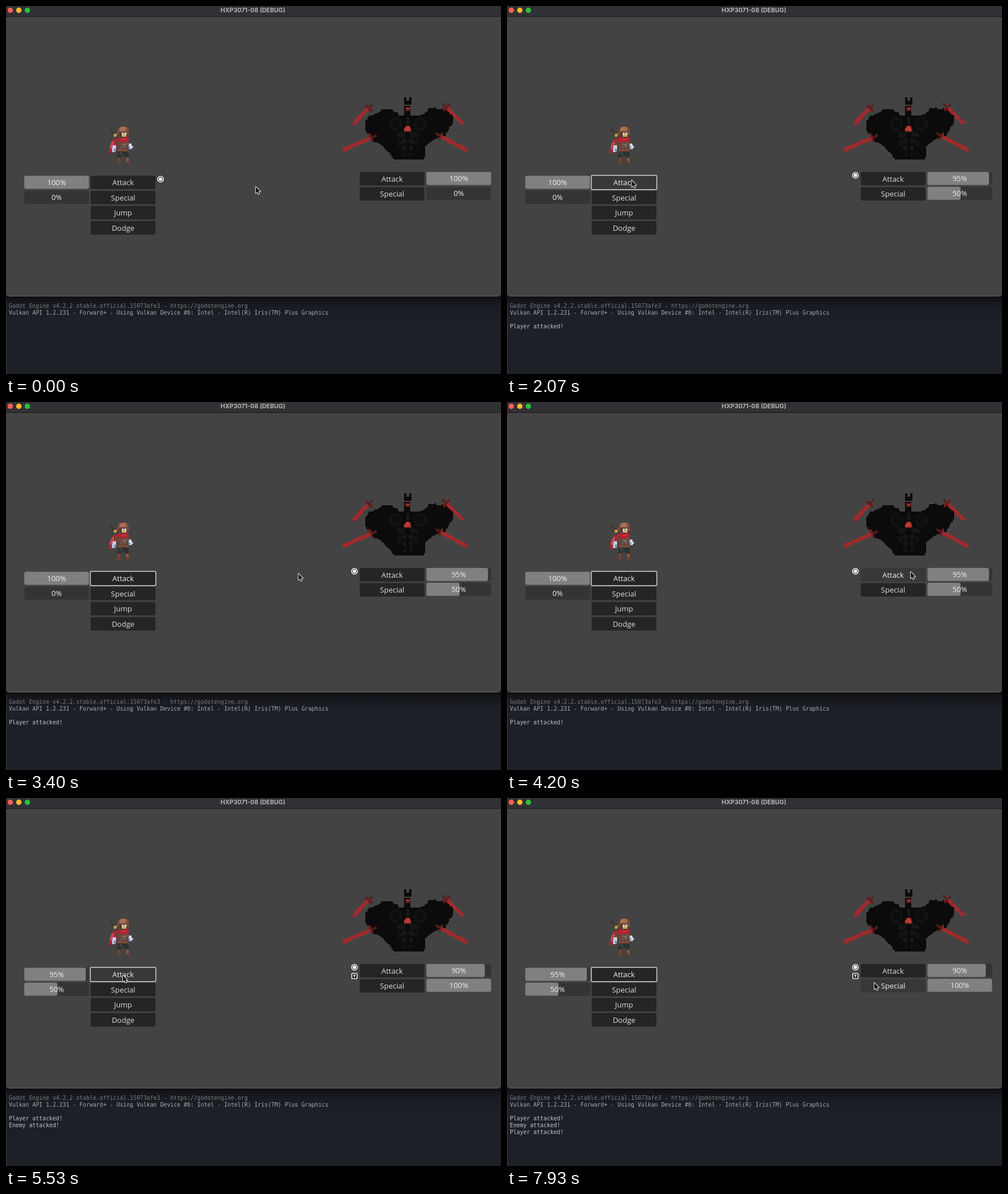
An HTML page with a canvas for the animation above (8 s loop, 868 by 645 pixels).

```html
<!DOCTYPE html>
<html lang="en">
<head>
<meta charset="utf-8">
<title>Turn battle</title>
<style>
  html, body { margin: 0; width: 100%; height: 100%; overflow: hidden; background: #1d2027; }
  canvas { display: block; width: 868px; height: 645px; }
</style>
</head>
<body>
<canvas id="stage" width="868" height="645"></canvas>
<script>
const W = 868, H = 645, LOOP = 8000;
const ctx = document.getElementById('stage').getContext('2d');
const scene = Object.assign(document.createElement('canvas'), { width: W, height: H });
const art = scene.getContext('2d');

const UI_FONT = '13px "Open Sans", "Noto Sans", sans-serif';
const MONO_FONT = '9.81px "DejaVu Sans Mono", monospace';

function text(c, str, x, y, font, color, align = 'left') {
  c.font = font;
  c.fillStyle = color;
  c.textAlign = align;
  c.fillText(str, x, y);
}

function box(c, x, y, w, h, r, color) {
  c.fillStyle = color;
  c.beginPath();
  c.roundRect(x, y, w, h, r);
  c.fill();
}

function disc(c, x, y, r, color) {
  c.fillStyle = color;
  c.beginPath();
  c.arc(x, y, r, 0, 7);
  c.fill();
}

// Fills a path with square cells, giving it a pixel-art edge.
function pixelFiller([left, top, right, bottom], cell) {
  return (color, d) => {
    const path = new Path2D(d);
    art.fillStyle = color;
    for (let y = top; y < bottom; y += cell)
      for (let x = left; x < right; x += cell)
        if (art.isPointInPath(path, x + cell / 2, y + cell / 2)) {
          const px = Math.round(x), py = Math.round(y);
          art.fillRect(px, py, Math.round(x + cell) - px, Math.round(y + cell) - py);
        }
  };
}

function line(x1, y1, x2, y2, width) {
  const len = Math.hypot(x2 - x1, y2 - y1);
  const nx = (y1 - y2) / len * width / 2, ny = (x2 - x1) / len * width / 2;
  return `M${x1 + nx} ${y1 + ny}L${x2 + nx} ${y2 + ny}L${x2 - nx} ${y2 - ny}L${x1 - nx} ${y1 - ny}Z`;
}

const rect = (x, y, w, h) => `M${x} ${y}h${w}v${h}h${-w}Z`;

function drawHero() {
  const fill = pixelFiller([179, 210.5, 226, 281], 1.7);
  fill('#45341f', line(183, 216, 196, 230, 2.6));
  fill('#c9a03e', rect(188.5, 224, 5, 6));
  fill('#9c2b34', 'M198 230L188 234L184 239L182 248L179 257L187 258L194 250Z');
  fill('#c94a50', 'M190 234L184 241L182 250L186 249L189 241Z');
  fill('#7d4d3c', 'M201 211H209L214 214V222H216V225H195V221L198 213Z');
  fill('#a87056', 'M201 212H208L212 216L208 219H199Z');
  fill('#5a392d', rect(197, 220, 5, 8));
  fill('#b9805c', rect(202, 223, 10, 7));
  fill('#d9ad54', rect(203, 226, 8, 3.4));
  fill('#b5d8df', rect(203, 223, 3, 3));
  fill('#b5d8df', rect(208, 223, 3, 3));
  fill('#5d4842', 'M195 237H214L215 246L213 256H197Z');
  fill('#736b69', rect(201, 241, 8, 7));
  fill('#7a4a36', rect(196, 251, 18, 3.4));
  fill('#704536', line(198, 240, 211, 252, 2.6));
  fill('#b3252e', 'M198 228L203 231L213 229L216 235L209 239H199L196 235Z');
  fill('#d54a4b', rect(202, 232, 8, 2.6));
  fill('#744038', rect(191, 237, 5, 8));
  fill('#c2cee2', 'M187 244H192L193 252L190 256H186Z');
  fill('#8494b0', rect(189, 250, 4, 4));
  fill('#7d4c3a', rect(212, 237, 5, 7));
  fill('#d3deee', 'M215 243L219 241L223 248L219 252H214Z');
  fill('#8696b3', rect(214, 247, 4, 4));
  fill('#2b322f', 'M196 255H214L216 265H208L205 261L202 265H195Z');
  fill('#3c4540', rect(199, 257, 4, 4));
  fill('#69402f', 'M195 265H202L201 277H194L193 274L196 272Z');
  fill('#69402f', 'M209 265H215L217 277H211Z');
  fill('#8b5b46', rect(197, 266, 3, 6));
  fill('#8b5b46', rect(211, 266, 3, 6));
}

function drawBoss() {
  const fill = pixelFiller([588, 159.5, 814, 271], 2.2);
  const sword = (hx, hy, tx, ty) => {
    const len = Math.hypot(tx - hx, ty - hy), ux = (tx - hx) / len, uy = (ty - hy) / len;
    fill('#a12a2b', line(hx, hy, tx, ty, 6.5));
    fill('#541a1b', line(hx - ux * 10, hy - uy * 10, hx + ux * 2, hy + uy * 2, 3.6));
    fill('#651d1e', line(hx - uy * 8, hy + ux * 8, hx + uy * 8, hy - ux * 8, 3.6));
  };

  fill('#0b0b0b', 'M698 159H702V166H707V159H711V172H698Z');
  fill('#0b0b0b', `M699 174H710V192H716L724 192L733 189L738 184L741 179L752 178L757 181L768 180H778
    L780 190L783 192V205L776 217L769 228L753 233L742 240L735 248V262L733 269H682L676 263L672 257
    L664 250L658 244L650 238H641L638 224L632 222L629 214V204L636 194L646 190L655 185L662 181H676
    L680 185L686 187L690 192H699Z`);

  // Armour plates, mirrored around the spine.
  for (const side of [-1, 1]) {
    const plate = (color, x, y, rx, ry) => {
      const cx = 704.5 + side * x;
      fill(color, `M${cx - rx} ${y}A${rx} ${ry} 0 1 1 ${cx + rx} ${y}A${rx} ${ry} 0 1 1 ${cx - rx} ${y}Z`);
    };
    plate('#131313', 22, 207, 11, 12);
    plate('#0d0d0d', 21, 206, 7, 8);
    plate('#151515', 12, 226, 7, 5);
    plate('#161616', 6, 237, 5, 5);
    plate('#121212', 15, 241, 4, 6);
    plate('#161616', 6, 249, 4, 5);
    plate('#131313', 5, 260, 3, 4);
  }
  fill('#181818', rect(702, 194, 5, 13));
  fill('#5a1919', rect(700, 177, 9, 7));
  fill('#b83a37', rect(702, 179, 5, 3.5));
  fill('#5d1a1a', 'M701 211H708L711 215V220H698V215Z');
  fill('#bd3835', 'M702 211H707L710 215V218H699V215Z');

  sword(636, 179, 609, 207);
  sword(772, 178, 801, 207);
  sword(640, 231, 591, 253);
  sword(762, 228, 810, 254);
}

function drawBackdrop() {
  box(art, 0, 0, W, H, 0, '#1d2027');
  box(art, 0, 510, 1.5, 135, 0, '#33363c');
  text(art, 'Godot Engine v4.2.2.stable.official.15073afe3 - https://godotengine.org', 5, 528.5, MONO_FONT, '#929395');
  text(art, 'Vulkan API 1.2.231 - Forward+ - Using Vulkan Device #0: Intel - Intel(R) Iris(TM) Plus Graphics', 5, 540.5, MONO_FONT, '#b4b5b6');
  const shadow = art.createLinearGradient(0, 508, 0, 545);
  shadow.addColorStop(0, 'rgba(0,0,0,.55)');
  shadow.addColorStop(.35, 'rgba(0,0,0,.22)');
  shadow.addColorStop(1, 'rgba(0,0,0,0)');
  box(art, 0, 508, W, 37, 0, shadow);
  box(art, 0, 490, W, 20, [0, 0, 6, 6], '#101114');
  box(art, 0, 490, W, 19, [0, 0, 6, 6], '#666666');
  box(art, 0, 18, W, 490, [0, 0, 5, 5], '#434343');
  box(art, 0, 0, W, 18, 0, '#313135');
  box(art, 0, 18, W, 1, 0, '#161616');
  ['#fe5f57', '#febc2e', '#28c03f'].forEach((color, i) => disc(art, 7.5 + 15 * i, 7.5, 4.7, color));
  text(art, 'HXP3071-08 (DEBUG)', 433, 11, 'bold 10.6px Inter, sans-serif', '#b4b4b5', 'center');
  drawHero();
  drawBoss();
}

const BUTTON_W = 113.5, BUTTON_H = 23.5;
const column = (x, y, labels) => labels.map((label, i) => ({ label, x, y: y + 26.5 * i }));
const heroButtons = column(148.5, 297.5, ['Attack', 'Special', 'Jump', 'Dodge']);
const bossButtons = column(620.3, 291, ['Attack', 'Special']);
const buttons = [...heroButtons, ...bossButtons];

// Each click presses a button, hits on release and is logged a little later.
const PRESS_TIME = 130, LOG_DELAY = 210;
const clicks = [
  { button: heroButtons[0], hit: 1330, log: 'Player attacked!' },
  { button: bossButtons[0], hit: 4600, log: 'Enemy attacked!' },
  { button: heroButtons[0], hit: 5480, log: 'Player attacked!' }
];

// Percentages and turn owner after each click.
const states = [
  { hero: [100, 0], boss: [100, 0], turn: 'hero' },
  { hero: [100, 0], boss: [95, 50], turn: 'boss' },
  { hero: [95, 50], boss: [95, 50], turn: 'hero' },
  { hero: [95, 50], boss: [90, 100], turn: 'boss' }
];

const cursorStops = [
  [0, 438, 317], [100, 438, 317], [800, 200, 307], [1800, 200, 307], [2350, 238, 305],
  [2900, 238, 305], [3800, 708, 298], [4800, 708, 298], [5330, 205, 311], [5750, 205, 311],
  [6520, 689, 324], [7050, 689, 324], [7500, 644, 324], [LOOP, 644, 324]
];

function cursorAt(t) {
  const i = cursorStops.findIndex(stop => stop[0] > t);
  const [t0, x0, y0] = cursorStops[i - 1], [t1, x1, y1] = cursorStops[i];
  const p = (t - t0) / (t1 - t0), k = p * p * (3 - 2 * p);
  return [x0 + (x1 - x0) * k, y0 + (y1 - y0) * k];
}

function drawButton({ label, x, y }, hover, pressed, focused) {
  box(ctx, x, y, BUTTON_W, BUTTON_H, 2, pressed ? '#1c1c1c' : hover ? '#383838' : '#252525');
  if (focused) {
    ctx.strokeStyle = '#cfcfcf';
    ctx.lineWidth = 1.5;
    ctx.beginPath();
    ctx.roundRect(x - .7, y - .7, BUTTON_W + 1.4, BUTTON_H + 1.4, 2);
    ctx.stroke();
  }
  text(ctx, label, x + BUTTON_W / 2, y + 16.5, UI_FONT, hover || focused ? '#f0f0f0' : '#dedede', 'center');
}

function drawBars(x, y, values) {
  values.forEach((value, i) => {
    const top = y + 26 * i;
    box(ctx, x, top, BUTTON_W, 23, 3.5, '#343434');
    if (value) box(ctx, x, top, 3 + (BUTTON_W - 3) * value / 100, 23, 3.5, '#808080');
    text(ctx, value + '%', x + BUTTON_W / 2, top + 16.5, UI_FONT, '#f0f0f0', 'center');
  });
}

function drawTurnIcon(x, y) {
  disc(ctx, x, y, 5.7, '#fff');
  disc(ctx, x, y, 4.2, '#202020');
  disc(ctx, x, y, 3.1, '#fff');
}

function drawReadyIcon(x, y) {
  box(ctx, x - 5.3, y - 5.3, 10.6, 10.6, 1.5, '#fff');
  box(ctx, x - 3.9, y - 3.9, 7.8, 7.8, .5, '#282828');
  box(ctx, x - 2, y - 2.2, 4, 1.4, 0, '#fff');
  box(ctx, x - .7, y - 2.2, 1.4, 4.4, 0, '#fff');
}

function drawCursor(x, y) {
  const arrow = new Path2D('M0 0V11L2.6 8.7L4.4 12.6L6.3 11.8L4.6 8H8Z');
  ctx.save();
  ctx.translate(x, y);
  ctx.lineWidth = 1.8;
  ctx.lineJoin = 'round';
  ctx.strokeStyle = '#f4f4f4';
  ctx.stroke(arrow);
  ctx.fillStyle = '#141414';
  ctx.fill(arrow);
  ctx.restore();
}

function draw(t) {
  const [mx, my] = cursorAt(t);
  const current = clicks.findLast(c => t >= c.hit - PRESS_TIME);
  const state = states[clicks.filter(c => t >= c.hit).length];

  ctx.drawImage(scene, 0, 0);
  for (const b of buttons) {
    const hover = mx >= b.x && mx < b.x + BUTTON_W && my >= b.y && my < b.y + BUTTON_H;
    const focused = !!current && current.button === b;
    drawButton(b, hover, focused && t < current.hit, focused);
  }
  drawBars(32, 297.5, state.hero);
  drawBars(737.2, 290.8, state.boss);
  if (state.turn === 'hero') drawTurnIcon(271, 303.5);
  else drawTurnIcon(611, 296.7);
  if (state.boss[1] === 100) drawReadyIcon(611, 312);
  clicks.forEach((c, i) => {
    if (t >= c.hit + LOG_DELAY) text(ctx, c.log, 5, 565 + 12.2 * i, MONO_FONT, '#c3c4c5');
  });
  drawCursor(mx, my);
}

drawBackdrop();
const start = performance.now();
function tick() {
  draw((performance.now() - start) % LOOP);
  requestAnimationFrame(tick);
}
tick();
</script>
</body>
</html>
```
